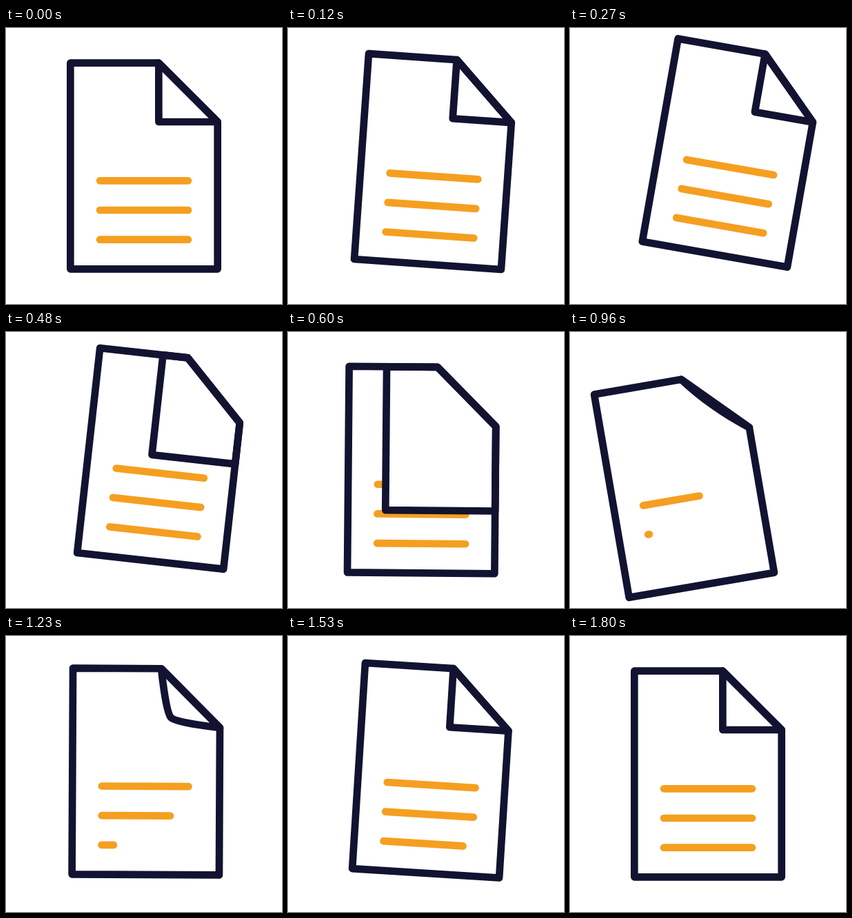
An HTML page that plays this animation: 400 px wide and 400 px high, repeating every 3.86 s.

```html
<!DOCTYPE html>
<html lang="en">
<head>
<meta charset="utf-8">
<title>Document icon</title>
<style>
  html, body { margin: 0; width: 100%; height: 100%; overflow: hidden; background: #fff; }
  svg { display: block; width: 100%; height: 100%; }
  path { stroke-width: 10.67; stroke-linecap: round; stroke-linejoin: round; fill: none; }
  .ink { stroke: #121331; }
  .text { stroke: #f59f20; }
  #oldFold, #newFold { fill: #fff; }
</style>
</head>
<body>
<svg viewBox="0 0 400 400">
  <g id="page">
    <path id="oldText" class="text" d="M136 221.33H264M136 264H264M136 306.67H264"/>
    <path id="oldFold" class="ink"/>
    <path id="newFold" class="ink"/>
    <path class="text line"/>
    <path class="text line"/>
    <path class="text line"/>
    <path class="ink" d="M93.33 50.67H221.33L306.67 136V349.33H93.33Z"/>
  </g>
</svg>
<script>
const STEP = 30, LOOP = 3860, LAST = 60;
const LEFT = 93.33, TOP = 50.67, RIGHT = 306.67, BOTTOM = 349.33;
const FOLD_X = 221.33, FOLD_Y = 136;
const TURN_START = 9, TURN_END = 28.8, TURN_TIME = 20;
const LINE_START = 24.5, LINE_DELAY = 7, LINE_TIME = 20;

// step, angle, x, y of the swinging page
const poses = [
  [0, 0, 0, 0],
  [9, 10, 35.75, -19],
  [11.5, 10.2, 39.1, -21.9],
  [18, 3.7, 15, -12],
  [20, 0.5, -6, 0],
  [29.5, -10, -36.7, 20.3],
  [32, -9.75, -34.5, 19.6],
  [36, -5, -24.4, 13.6],
  [41, 0.28, 3, -3.5],
  [46.7, 5, 14, -8.7],
  [51, 3.6, 9, -5.25],
  [54, 2.1, 3.8, -2.5],
  [60, 0, 0, 0]
];

const $ = id => document.getElementById(id);
const lines = document.querySelectorAll('.line');
const clamp = v => Math.min(1, Math.max(0, v));
const mix = (a, b, p) => a + (b - a) * p;
const smooth = u => u * u * (3 - 2 * u);
const progress = (n, start, time) => clamp((n - start) / time);

// cubic-bezier(.25, .1, .25, 1)
function ease(x) {
  const curve = (s, a, b) => 3 * s * (1 - s) ** 2 * a + 3 * s * s * (1 - s) * b + s ** 3;
  let low = 0, high = 1;
  for (let i = 0; i < 24; i++) {
    const mid = (low + high) / 2;
    if (curve(mid, 0.25, 0.25) < x) low = mid; else high = mid;
  }
  return curve(low, 0.1, 1);
}

function slope(i, k) {
  const rate = j => (poses[j + 1][k] - poses[j][k]) / (poses[j + 1][0] - poses[j][0]);
  if (i === 0 || i === poses.length - 1) return 0;
  const a = rate(i - 1), b = rate(i);
  return a * b > 0 ? 2 * a * b / (a + b) : 0;
}

// Monotone cubic interpolation between poses
function poseValue(n, k) {
  let i = 0;
  while (i < poses.length - 2 && n >= poses[i + 1][0]) i++;
  const [p, q] = [poses[i], poses[i + 1]];
  const span = q[0] - p[0], u = (n - p[0]) / span, v = 1 - u;
  return mix(p[k], q[k], smooth(u))
    + span * u * v * (v * slope(i, k) - u * slope(i + 1, k));
}

function turningFold(p) {
  const x = mix(FOLD_X, LEFT, p), y = mix(FOLD_Y, BOTTOM, p);
  return `M${FOLD_X} ${TOP}L${x} ${TOP}V${y}H${RIGHT}V${FOLD_Y}Z`;
}

function curlingFold(p) {
  const x = mix((FOLD_X + RIGHT) / 2, FOLD_X, p);
  const y = mix((TOP + FOLD_Y) / 2, FOLD_Y, p);
  const h = 23 * (1 - p);
  return `M${FOLD_X} ${TOP}C${FOLD_X} ${TOP} ${x - h} ${y - h} ${x} ${y}`
    + `C${x + h} ${y + h} ${RIGHT} ${FOLD_Y} ${RIGHT} ${FOLD_Y}Z`;
}

const show = (el, on) => el.setAttribute('visibility', on ? 'visible' : 'hidden');

function draw(n) {
  const [angle, x, y] = [1, 2, 3].map(k => poseValue(n, k));
  $('page').setAttribute('transform', `translate(${x} ${y}) rotate(${angle} 200 200)`);

  const turned = n >= TURN_END;
  show($('oldText'), !turned);
  show($('oldFold'), !turned);
  show($('newFold'), turned);
  $('oldFold').setAttribute('d', turningFold(smooth(progress(n, TURN_START, TURN_TIME))));
  $('newFold').setAttribute('d', curlingFold(smooth(progress(n, TURN_END, TURN_TIME))));

  lines.forEach((line, i) => {
    const u = progress(n, LINE_START + i * LINE_DELAY, LINE_TIME);
    show(line, u > 0);
    line.setAttribute('d', `M136 ${221.33 + i * 42.67}h${128 * ease(u)}`);
  });
}

function tick() {
  draw(Math.min(LAST, Math.floor(performance.now() % LOOP / STEP)));
  requestAnimationFrame(tick);
}
tick();
</script>
</body>
</html>
```
